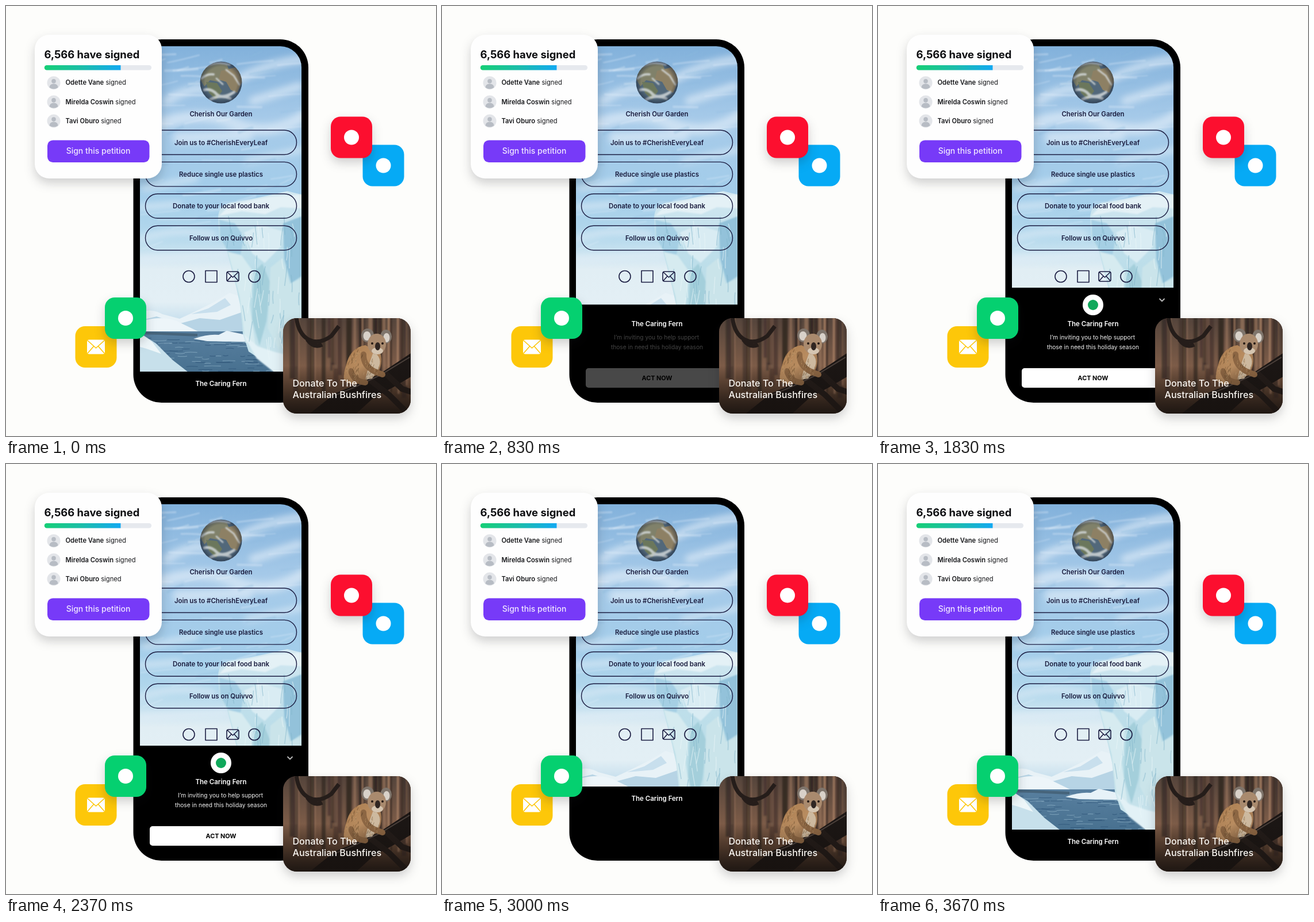
Animation of 748x748 px, one loop 3710 ms. Source, as an HTML page:

```html
<!DOCTYPE html>
<html lang="en">
<head>
<meta charset="utf-8">
<title>Campaign page</title>
<style>
html, body { margin: 0; width: 100%; height: 100%; overflow: hidden; background: #fdfdfb; }
svg { display: block; width: 100vw; height: 100vh; font-family: Inter, sans-serif; }
.mid { text-anchor: middle; }
.link { font-size: 11.4px; font-weight: 600; fill: #191b3d; }
.row { font-size: 11.2px; fill: #16171a; }
.row tspan { font-weight: 600; }
.lift { filter: drop-shadow(0 8px 9px rgba(20, 20, 30, .2)); }
.line { fill: none; stroke: #1b1d42; stroke-width: 1.6; stroke-linejoin: round; }
</style>
</head>
<body>
<svg viewBox="0 0 748 748" xmlns="http://www.w3.org/2000/svg">
  <defs>
    <linearGradient id="sky" x1="0" y1="0" x2="0" y2="1">
      <stop offset="0" stop-color="#82b1db"/>
      <stop offset=".22" stop-color="#a6cae9"/>
      <stop offset=".45" stop-color="#a3cdea"/>
      <stop offset=".58" stop-color="#b3d8ec"/>
      <stop offset=".68" stop-color="#e1eef4"/>
      <stop offset=".78" stop-color="#e3eff5"/>
      <stop offset=".84" stop-color="#c6dfed"/>
    </linearGradient>
    <linearGradient id="ice" x1="0" y1="0" x2="0" y2="1">
      <stop offset="0" stop-color="#d3e8f1"/>
      <stop offset=".3" stop-color="#bfdfeb"/>
      <stop offset=".65" stop-color="#b8dce6"/>
      <stop offset="1" stop-color="#cfe6ee"/>
    </linearGradient>
    <linearGradient id="sea" x1="0" y1="0" x2="0" y2="1">
      <stop offset="0" stop-color="#587f9f"/>
      <stop offset="1" stop-color="#47708f"/>
    </linearGradient>
    <linearGradient id="bar">
      <stop offset="0" stop-color="#16cf76"/>
      <stop offset=".5" stop-color="#1bbdaa"/>
      <stop offset="1" stop-color="#12a9f2"/>
    </linearGradient>
    <linearGradient id="wood" x1="0" y1="0" x2="0" y2="1">
      <stop offset="0" stop-color="#54443b"/>
      <stop offset=".5" stop-color="#7d5c48"/>
      <stop offset=".75" stop-color="#5b4232"/>
      <stop offset="1" stop-color="#2b211b"/>
    </linearGradient>
    <linearGradient id="fur" x1="0" y1="0" x2="1" y2="1">
      <stop offset="0" stop-color="#a97a4c"/>
      <stop offset=".5" stop-color="#b88c60"/>
      <stop offset="1" stop-color="#7a583c"/>
    </linearGradient>
    <linearGradient id="dusk" x1="0" y1="0" x2="0" y2="1">
      <stop offset=".5" stop-color="#140e0b" stop-opacity="0"/>
      <stop offset="1" stop-color="#140e0b" stop-opacity=".5"/>
    </linearGradient>
    <radialGradient id="limb">
      <stop offset=".75" stop-color="#0b1830" stop-opacity="0"/>
      <stop offset="1" stop-color="#0b1830" stop-opacity=".45"/>
    </radialGradient>
    <filter id="haze" x="-20%" y="-20%" width="140%" height="140%"><feGaussianBlur stdDeviation="6"/></filter>
    <filter id="soft"><feGaussianBlur stdDeviation="1.3"/></filter>
    <clipPath id="screen"><path d="M233 640V107A37 37 0 0 1 270 70H477A37 37 0 0 1 514 107V640Z"/></clipPath>
    <clipPath id="globe"><circle cx="374" cy="133" r="36.5"/></clipPath>
    <clipPath id="photo"><rect x="482" y="543" width="222" height="166" rx="24"/></clipPath>
    <path id="body" d="M625 590Q602 594 594 617T588 650Q598 663 620 654L645 642Q657 623 651 603Z"/>
    <clipPath id="coat"><use href="#body"/></clipPath>
  </defs>
  <rect width="748" height="748" fill="#fdfdfb"/>

  <rect x="221.5" y="58" width="304.5" height="632" rx="49"/>
  <g clip-path="url(#screen)">
    <rect x="233" y="70" width="281" height="570" fill="url(#sky)"/>
    <g filter="url(#haze)" fill="none" stroke="#e6f0f9" stroke-linecap="round" opacity=".6">
      <path d="M400 130Q450 100 520 92M280 165Q320 140 350 145M430 165L510 140" stroke-width="15"/>
      <path d="M270 205Q340 180 400 205T520 190M300 230L420 225" stroke-width="20"/>
      <path d="M420 270L515 250M240 318L330 300" stroke-width="10"/>
      <path d="M235 350L300 345M235 405Q290 385 360 398M235 440L385 432" stroke-width="11"/>
    </g>
    <g id="clouds" filter="url(#soft)" fill="none"/>
    <path d="M233 533Q252 525 272 536L302 544 330 531 362 515 389 499 425 511V574H233Z" fill="#e8f2f7"/>
    <path d="M233 547L262 540 300 553 337 543 372 546 412 532V575H233Z" fill="#b7d4e5"/>
    <path d="M322 536L352 526 381 508 391 520 367 532 346 534Z" fill="#c8dfed"/>
    <path d="M233 549Q275 536 303 551L334 566H233Z" fill="#edf5f9"/>
    <rect x="233" y="566" width="281" height="74" fill="url(#sea)"/>
    <g id="waves" fill="none"/>
    <path d="M233 566L285 568 333 570 333 575 270 572 233 571Z" fill="#46647b"/>
    <path d="M326 579Q352 570 370 572L384 565 417 572 451 580 414 584 350 583Z" fill="#e7f2f8"/>
    <path d="M233 569L261 587 290 616 321 640H233Z" fill="#c7e0eb"/>
    <path d="M233 569L254 584 270 605 244 596 233 593Z" fill="#edf6f9"/>
    <path d="M369 369Q369 347 390 342L426 336 459 329 489 322 514 328V640H470L448 618 422 601 412 570 408 523 400 487 391 452 384 425 371 407Z" fill="url(#ice)"/>
    <g filter="url(#soft)">
      <path d="M371 365L390 345 457 332 514 328V352L478 350 451 362 410 357Z" fill="#e4f1f6"/>
      <path d="M371 372L398 378 414 402 408 432 388 428 373 405Z" fill="#a5cfe4"/>
      <path d="M386 428L410 434 430 462 424 520 434 590 416 585 406 505Z" fill="#d6ebf0"/>
      <path d="M414 394L444 381 482 392 478 419 450 447 428 430Z" fill="#d9ecf3"/>
      <path d="M482 378L514 366V470L496 482 484 440Z" fill="#93c2da"/>
      <path d="M432 462L446 448 460 482 453 548 441 591 428 545Z" fill="#a4cfdb"/>
      <path d="M460 455L480 439 494 483 514 474V575L490 552 474 597 455 560Z" fill="#cae4ea"/>
      <path d="M412 570L438 592 468 602 514 613V640H470L436 613Z" fill="#e2f1f6"/>
    </g>
    <g id="cracks" fill="none" stroke-width="1.5"/>
  </g>

  <g clip-path="url(#globe)">
    <rect x="337" y="96" width="74" height="74" fill="#52687a"/>
    <path d="M343 110L362 99 384 101 389 114 377 120 370 132 355 129 345 140 338 128Z" fill="#80816a"/>
    <path d="M374 113L402 106 412 129 402 151 391 146 383 132 370 128Z" fill="#8d8064"/>
    <path d="M348 132L367 134 376 148 365 163 353 151Z" fill="#6b775c"/>
    <g filter="url(#soft)" fill="none" stroke="#d6dbdd" stroke-linecap="round" opacity=".8">
      <path d="M348 105Q367 95 389 102M340 126Q350 117 361 119" stroke-width="4"/>
      <path d="M345 146Q357 143 366 153T397 150M355 163Q373 153 390 161" stroke-width="5"/>
      <path d="M383 111L396 121 406 137M366 126L377 136" stroke-width="3"/>
    </g>
    <circle cx="374" cy="133" r="36.5" fill="url(#limb)"/>
  </g>
  <text class="mid link" x="374" y="192">Cherish Our Garden</text>
  <g id="links"/>
  <g class="line">
    <circle cx="318" cy="470.5" r="10"/>
    <rect x="347" y="460.5" width="20" height="20"/>
    <rect x="384" y="462" width="21" height="17" rx="3"/>
    <path d="M385 463L394.5 472 404 463M385 478L392 470M404 478L397 470"/>
    <circle cx="432" cy="470.5" r="10"/>
  </g>

  <g clip-path="url(#screen)"><rect id="panel" x="232" width="283" height="160"/></g>
  <g id="badge">
    <circle cx="374" cy="30" r="18" fill="#fff"/>
    <circle cx="374" cy="30" r="9" fill="#10a85b"/>
    <path d="M489.5 19L494 23.5 498.5 19" fill="none" stroke="#bdbdbd" stroke-width="1.8"/>
  </g>
  <text id="name" class="mid" x="374" font-size="11.5" font-weight="600" fill="#fff">The Caring Fern</text>
  <g id="offer" class="mid">
    <g font-size="10.2" fill="#f3f3f3">
      <text x="373" y="580">I’m inviting you to help support</text>
      <text x="374" y="596.5">those in need this holiday season</text>
    </g>
    <rect x="250" y="630" width="248" height="34" rx="5" fill="#fff"/>
    <text x="374" y="651" font-size="10.8" font-weight="700">ACT NOW</text>
  </g>

  <g id="tiles"/>
  <rect x="141" y="580.5" width="31" height="25" rx="4" fill="#fff"/>
  <path d="M142 582L156.5 595 171 582M142 604L152.5 592M171 604L160.5 592" fill="none" stroke="#fdc709" stroke-width="1.6"/>
  <g id="front"/>

  <rect class="lift" x="50" y="50" width="221" height="250" rx="25" fill="#fefefe"/>
  <text x="66.5" y="91" font-size="18.4" font-weight="700" fill="#0c0d10">6,566 have signed</text>
  <rect x="67" y="103" width="186" height="8.5" rx="4.2" fill="#e6e9ee"/>
  <path d="M71 103H199.5V111.5H71A4.25 4.25 0 0 1 71 103Z" fill="url(#bar)"/>
  <g id="people"/>
  <rect x="72" y="233.5" width="177.5" height="38.5" rx="9.5" fill="#773af8"/>
  <text class="mid" x="160.5" y="257.3" font-size="14" font-weight="500" fill="#f0e8ff">Sign this petition</text>

  <rect class="lift" x="482" y="543" width="222" height="166" rx="24" fill="#4b382e"/>
  <g clip-path="url(#photo)">
    <rect x="482" y="543" width="222" height="166" fill="url(#wood)"/>
    <g id="trunks" filter="url(#soft)"/>
    <path d="M505 540Q508 570 526 580T566 574L579 557M524 580Q535 596 550 589" fill="none" stroke="#251d1a" stroke-width="7"/>
    <path d="M525 712L572 674 611 658 653 638 706 603V644L674 663 640 681 606 712Z" fill="#1b1614"/>
    <path d="M632 650L666 676 698 708M659 638L689 666 707 672" fill="none" stroke="#231c19" stroke-width="10"/>
    <path d="M571 678L609 662 651 642 702 611" fill="none" stroke="#4b403b" stroke-width="2"/>
    <use href="#body" fill="url(#fur)"/>
    <path d="M639 602Q656 611 648 631L637 648 625 650 632 622Z" fill="#cdb99f"/>
    <path d="M622 606Q621 627 644 637L655 641M600 635Q605 653 625 655" fill="none" stroke="#8c6643" stroke-width="10" stroke-linecap="round"/>
    <g id="hairs" clip-path="url(#coat)"/>
    <g fill="#7f756c">
      <ellipse cx="629" cy="573" rx="11" ry="12"/>
      <ellipse cx="661" cy="575" rx="10" ry="12"/>
    </g>
    <g fill="#d8d1c9">
      <ellipse cx="628" cy="574" rx="6.5" ry="8"/>
      <ellipse cx="662" cy="577" rx="5.5" ry="8"/>
    </g>
    <ellipse cx="645" cy="588" rx="16" ry="18" fill="#a98a6e"/>
    <ellipse cx="646" cy="600" rx="10" ry="6" fill="#d5c5b1"/>
    <ellipse cx="646.5" cy="592" rx="4.5" ry="7" fill="#302622"/>
    <circle cx="637" cy="587" r="2" fill="#261b15"/>
    <circle cx="655" cy="587" r="2" fill="#261b15"/>
    <rect x="482" y="543" width="222" height="166" fill="url(#dusk)"/>
  </g>
  <g font-size="16.1" font-weight="500" fill="#faf7f2">
    <text x="498.5" y="661.5">Donate To The</text>
    <text x="498.5" y="681.5">Australian Bushfires</text>
  </g>
</svg>
<script>
const $ = id => document.getElementById(id);
const fill = (id, list, make) => { $(id).innerHTML = list.map(make).join(""); };
const count = n => Array.from({ length: n }, (_, i) => i);

let seed = 90210317;
const rnd = (lo, hi) => {
  seed = (seed * 16807) % 2147483647;
  return lo + (hi - lo) * seed / 2147483647;
};

fill("links", [
  "Join us to #CherishEveryLeaf",
  "Reduce single use plastics",
  "Donate to your local food bank",
  "Follow us on Quivvo"
], (label, i) => {
  const y = 216 + i * 55.4;
  return `<rect class="line" x="242.5" y="${y}" width="263" height="42.5" rx="21.2" style="stroke-width:1.4"/>
    <text class="mid link" x="374" y="${y + 25.5}">${label}</text>`;
});

fill("people", ["Odette Vane", "Mirelda Coswin", "Tavi Oburo"], (name, i) => {
  const y = 133.7 + i * 33.2;
  return `<circle cx="83" cy="${y}" r="11.5" fill="#e3e5e9"/>
    <circle cx="83" cy="${y - 3}" r="3.8" fill="#b7bcc4"/>
    <path d="M75.5 ${y + 8}Q76 ${y + 1.5} 83 ${y + 1.5}T90.5 ${y + 8}Q83 ${y + 13} 75.5 ${y + 8}Z" fill="#b7bcc4"/>
    <text class="row" x="103.5" y="${y + 3.7}"><tspan>${name}</tspan> signed</text>`;
});

const tile = ([x, y, color], look = "") =>
  `<rect class="${look}" x="${x}" y="${y}" width="72" height="72" rx="17" fill="${color}"/>`;
const dot = ([x, y]) => `<circle cx="${x + 36}" cy="${y + 36}" r="13" fill="#fff"/>`;
const blue = [620.5, 241.5, "#06aaf5"];
$("tiles").innerHTML = tile([120.5, 557, "#fdc709"]) + tile(blue) + dot(blue);
fill("front", [[565, 192.5, "#fc0f2f"], [172, 507, "#05d070"]], t => tile(t, "lift") + dot(t));

// Scenery details
const stroke = (x, y, dx, dy, color, opacity, width = 1) =>
  `<path d="M${x} ${y}q${dx / 2 + rnd(-2, 2)} ${dy / 2 + rnd(-2, 2)} ${dx} ${dy}"
    stroke="${color}" stroke-width="${width}" opacity="${opacity}"/>`;

fill("clouds", count(60), i =>
  stroke(rnd(225, 480), rnd(85, 425), rnd(20, 70), rnd(-14, 2), i % 4 ? "#e8f2fa" : "#8ab9df", .3, rnd(1, 5)));
fill("waves", count(100), i =>
  stroke(rnd(225, 500), rnd(575, 638), rnd(8, 30), 0, i % 2 ? "#86aac1" : "#31577a", .7, 1.2));
fill("cracks", count(60), i => {
  const y = rnd(360, 580), x = rnd(382 + Math.max(0, y - 390) * .2, 511);
  return stroke(x, y, rnd(-6, 6), rnd(14, 36), i % 2 ? "#ecf7f9" : "#82b6cb", .5, 1.5);
});
fill("trunks", count(44), i =>
  `<rect x="${rnd(480, 702)}" y="540" width="${rnd(2, 9)}" height="${rnd(70, 150)}"
    fill="${["#2c221f", "#b58a6c", "#41312b"][i % 3]}" opacity="${rnd(.35, .75)}"/>`);
fill("hairs", count(90), i =>
  stroke(rnd(588, 650), rnd(590, 655), rnd(-4, 0), rnd(4, 9), i % 2 ? "#d3ab7a" : "#70502f", .5));

const LOOP = 3710, MOVE = 750, OPEN = 318, CLOSE = 2630;
const clamp = x => Math.min(1, Math.max(0, x));
const ease = x => x < .5 ? 2 * x * x : 1 - 2 * (1 - x) ** 2;
const step = (t, from) => ease(clamp((t - from) / MOVE));

function draw(t) {
  const p = step(t, OPEN) - step(t, CLOSE);
  const top = 636 - 146 * p;
  $("panel").setAttribute("y", top);
  $("name").setAttribute("y", Math.max(557, top + 25));
  $("badge").setAttribute("transform", `translate(0 ${top})`);
  $("badge").setAttribute("opacity", clamp((p - .86) / .14));
  $("offer").setAttribute("opacity", clamp((p - .72) / .28));
}

let start;
function tick(now) {
  start ??= now;
  draw((now - start) % LOOP);
  requestAnimationFrame(tick);
}
draw(0);
requestAnimationFrame(tick);
</script>
</body>
</html>
```
